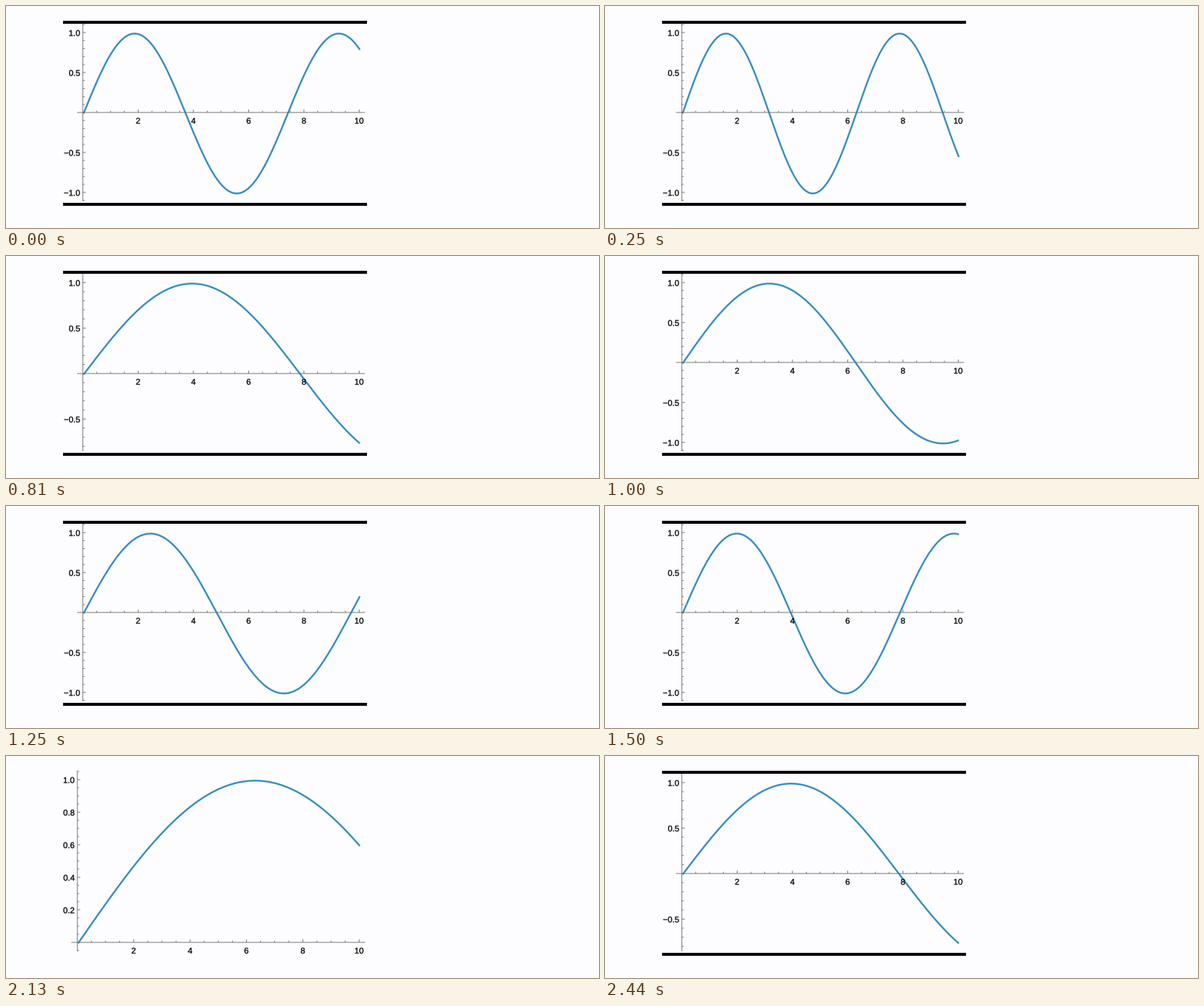
Recreate the animation shown at these times as a matplotlib script. Size 800 px wide and 300 px high, loop 2500 ms.

```python
import math

import matplotlib.pyplot as plt
import numpy as np
from matplotlib.animation import ArtistAnimation
from matplotlib.collections import LineCollection
from matplotlib.patches import Rectangle
from matplotlib.patheffects import Stroke

W, H, DPI = 800, 300, 100
PX = 72 / DPI                 # one pixel in points
BACK, BLUE, GREY = "#fdfcfe", "#338cc1", "#6c6c6c"
X_MAX, RIGHT = 10, 476.5      # end of the plotted domain and its pixel
TICK, MINOR = 4, 2.4          # tick lengths
SHIFT_X, SHIFT_Y = 0.9, 1.4   # the curve sits slightly off the axes

TICK_MS, LOOP_MS = 10, 2500
SHOT_MS = 62.5                # the picture is refreshed at 16 fps
RATES = [0.1 + 0.05 * i for i in range(19)]

plt.rcParams["font.family"] = "Liberation Sans"
fig = plt.figure(figsize=(W / DPI, H / DPI), dpi=DPI, facecolor=BACK)
ax = fig.add_axes([0, 0, 1, 1])
ax.set_xlim(0, W)
ax.set_ylim(H, 0)
ax.axis("off")

# A hairline outline gives the labels their slightly heavy look.
HEAVY = [Stroke(linewidth=0.3 * PX, foreground="black")]


def label(x, y, text, ha):
    return ax.text(x, y, text.replace("-", "\u2212"), ha=ha, va="baseline",
                   fontsize=11.2 * PX, color="black", zorder=4,
                   path_effects=HEAVY)


def bar(y):
    return ax.add_patch(Rectangle((77.4, y), 409.2, 4, color="black", lw=0))


def plot(rate):
    """All artists of the graph of sin(rate * x)."""
    xs = np.linspace(0, X_MAX, 400)
    ys = np.sin(rate * xs)
    low, high = ys.min(), ys.max()
    span = high - low
    signed = low < -1e-9

    # Wider labels shrink the graph, which leaves room for the bars.
    left, top, bottom = (103.7, 23.9, 263.9) if signed else (96.2, 19.7, 264.1)
    x_unit = (RIGHT - left) / X_MAX
    y_unit = 0.9 * (bottom - top) / span
    pad = 0.05 * (bottom - top)

    def to_x(x):
        return left + x * x_unit

    def to_y(y):
        return top + pad + (high - y) * y_unit

    base = to_y(0)
    margin = X_MAX * x_unit * 0.02 / 0.96
    lines = [[(left - margin, base), (RIGHT + margin, base)],
             [(left, top), (left, bottom)]]
    artists = []

    for i in range(1, 2 * X_MAX + 1):
        x, major = to_x(i / 2), i % 4 == 0
        lines.append([(x, base), (x, base - (TICK if major else MINOR))])
        if major:
            artists.append(label(x, base + 15, str(i // 2), "center"))

    step, parts = (0.5, 5) if span > 1.5 else (0.2, 4)
    small = step / parts
    first = math.ceil((low - span / 18) / small)
    last = math.floor((high + span / 18) / small)
    for i in range(first, last + 1):
        if i == 0:
            continue
        y, major = to_y(i * small), i % parts == 0
        lines.append([(left, y), (left + (TICK if major else MINOR), y)])
        if major:
            artists.append(label(left - 3.3, y + 4.5, f"{i * small:.1f}", "right"))

    axes_lines = LineCollection(lines, colors=GREY, linewidths=0.9 * PX, zorder=3)
    axes_lines.set_snap(False)
    artists.append(ax.add_collection(axes_lines, autolim=False))
    artists += ax.plot(to_x(xs) + SHIFT_X, to_y(ys) + SHIFT_Y, color=BLUE,
                       lw=2.3 * PX, solid_capstyle="butt", zorder=2,
                       scalex=False, scaley=False)
    if signed:
        artists += [bar(19.8), bar(266.4)]
    return artists


def rate_index(tick):
    """The rate grows 12 times a second and is seen through the 16 fps refresh."""
    shot = math.ceil((tick + 0.5) * TICK_MS / SHOT_MS) - 1
    return math.floor(15.5 + 0.75 * shot) % len(RATES)


plots = [plot(rate) for rate in RATES]
frames = [plots[rate_index(t)] for t in range(LOOP_MS // TICK_MS)]
anim = ArtistAnimation(fig, frames, interval=TICK_MS, repeat=True,
                       repeat_delay=0, blit=False)
plt.show()
```
